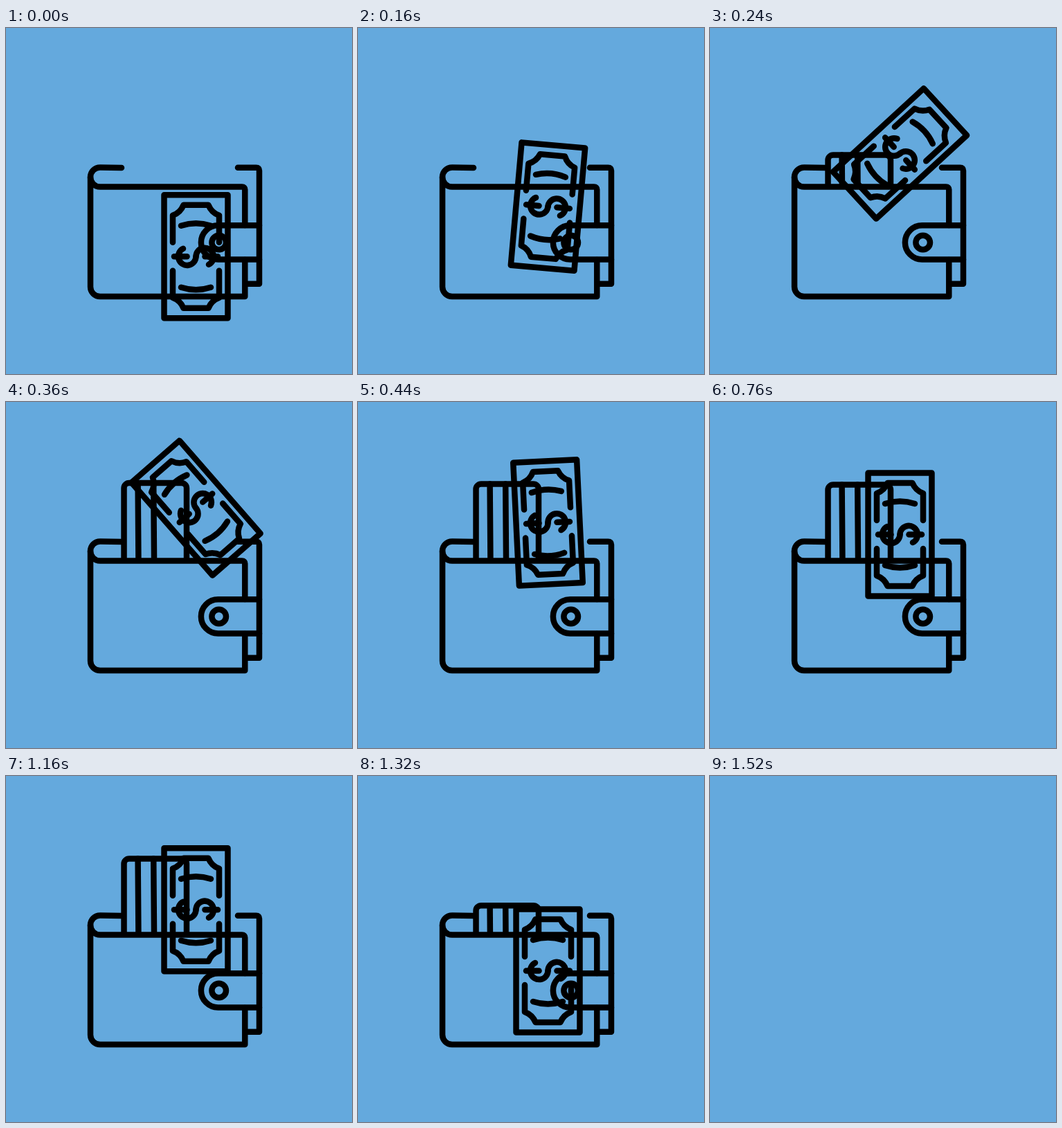
An HTML page for the animation above (1.56 s loop, 500 by 500 pixels).

```html
<!DOCTYPE html>
<html lang="en">
<head>
<meta charset="utf-8">
<title>Wallet</title>
<style>
  html, body { margin: 0; height: 100%; overflow: hidden; background: #64a9dd; }
  svg { display: block; width: 100%; height: 100%; }
  #scene { fill: none; stroke: #000; stroke-width: 8.5; stroke-linecap: round; stroke-linejoin: round; }
</style>
</head>
<body>
<svg viewBox="0 0 500 500">
  <defs>
    <clipPath id="pocket"><rect width="500" height="229.5"/></clipPath>
    <g id="billHalf">
      <path d="M-33.5-20.5V-59.5Q-22.5-63.5-18-74.5H18Q22.5-63.5 33.5-59.5V-20.5"/>
      <path d="M-21.5-44.5Q0-51.5 21.5-44.5"/>
      <path d="M-31.5 0H-13"/>
      <path d="M0 0A12.75 12.75 0 1 1 18.5 11.5"/>
    </g>
  </defs>
  <g id="scene">
    <g clip-path="url(#pocket)">
      <g id="card">
        <rect x="170.5" width="90.5" height="240" rx="7.5"/>
        <path d="M190.6 0L192.4 240M213.2 0L215 240"/>
      </g>
    </g>
    <g id="bill">
      <rect x="-46" y="-89" width="92" height="178"/>
      <use href="#billHalf"/>
      <use href="#billHalf" transform="rotate(180)"/>
    </g>
    <g id="wallet">
      <path d="M167 202L136 201.5A14 14 0 0 0 136 229.5H341Q345.3 229.5 345.3 233.5V285"/>
      <path d="M122 215.5V374A14 14 0 0 0 136 388H345.3V335"/>
      <path d="M335 201.7H361.5Q366 201.7 366 206V369.7H349"/>
      <path d="M366 285.3H306.5A24.6 24.6 0 0 0 306.5 334.5H366"/>
      <circle cx="307.7" cy="310" r="10.3"/>
    </g>
  </g>
</svg>
<script>
const LOOP = 1560, STEP = 40, BLANK_AT = 1520;

const [scene, card, bill] = ['scene', 'card', 'bill'].map(id => document.getElementById(id));

// Eased progress from 0 to 1 between two times.
function ease(t, from, to) {
  const u = Math.min(1, Math.max(0, (t - from) / (to - from)));
  return u * u * (3 - 2 * u);
}

// Jump up past the resting height, sag, settle, then drop back into the pocket.
function hop(t, { low, peak, sag, rest, start, top, leave }) {
  return low
    + (peak - low) * ease(t, start, top)
    + (sag - peak) * ease(t, top, 580)
    + (rest - sag) * ease(t, 600, 755)
    + (low - rest) * ease(t, leave, 1440);
}

const billHop = { low: 330.3, peak: 148.6, sag: 204.4, rest: 191.5, start: 44, top: 313, leave: 1140 };
const cardHop = { low: 238, peak: 115, sag: 131.2, rest: 119.6, start: 120, top: 380, leave: 1175 };

function draw(now) {
  const t = Math.floor((now % LOOP) / STEP) * STEP;
  const turn = 180 * ease(t, 126, 465);
  scene.setAttribute('visibility', t >= BLANK_AT ? 'hidden' : 'visible');
  card.setAttribute('transform', `translate(0 ${hop(t, cardHop)})`);
  bill.setAttribute('transform', `translate(274.5 ${hop(t, billHop)}) rotate(${turn})`);
}

const begin = performance.now();
function tick() {
  draw(performance.now() - begin);
  requestAnimationFrame(tick);
}
tick();
</script>
</body>
</html>
```
